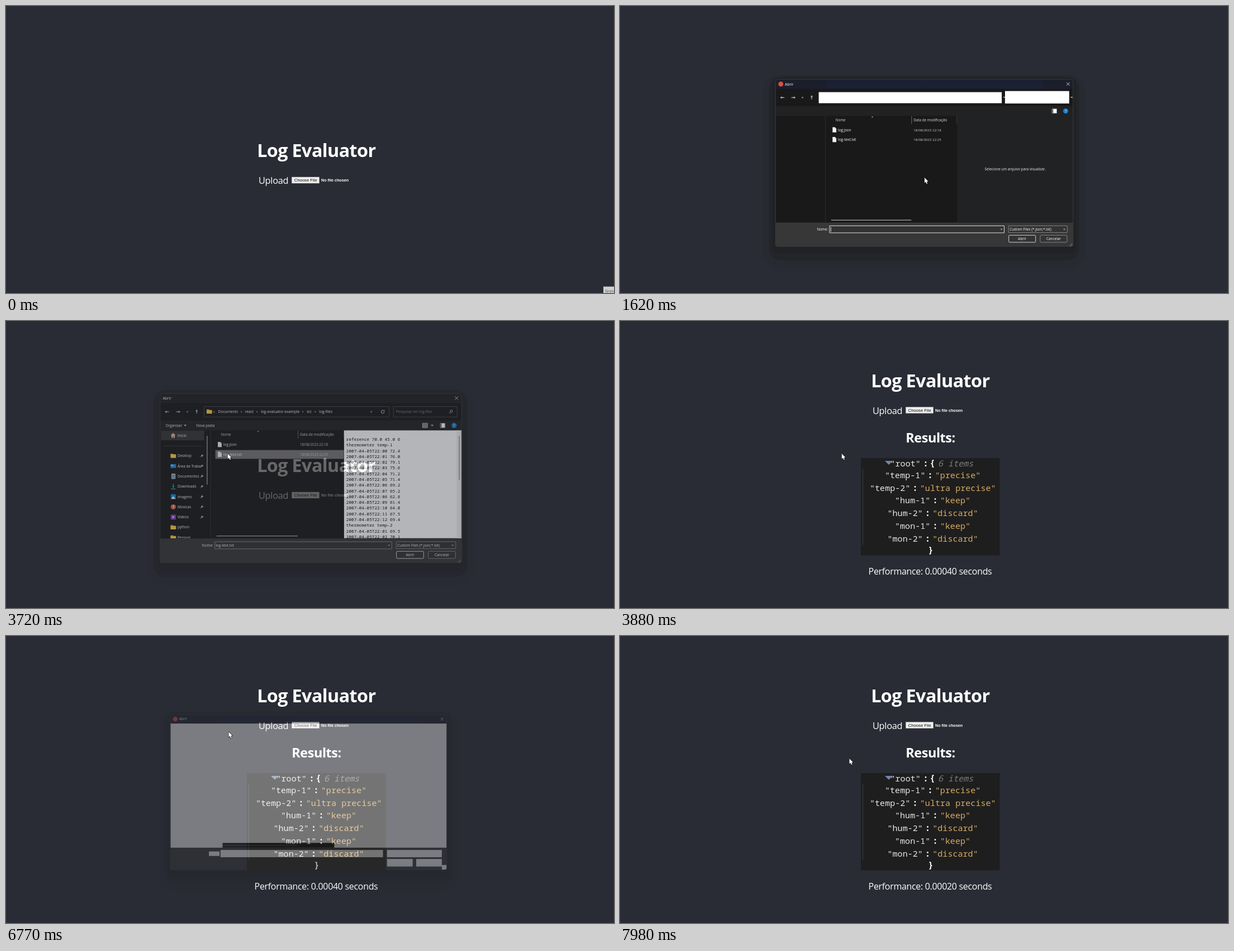
Animation, 1088 px wide and 515 px high, one loop 8000 ms. Source, as an HTML page with a canvas:

```html
<!DOCTYPE html>
<html lang="en">
<head>
<meta charset="utf-8">
<title>Log Evaluator</title>
<style>
html, body { margin: 0; width: 100%; height: 100%; overflow: hidden; background: #2a2c35; }
canvas { display: block; width: 1088px; height: 515px; }
</style>
</head>
<body>
<canvas id="stage" width="1088" height="515"></canvas>
<script>
const W = 1088, H = 515, LOOP = 8000;
const screen = document.getElementById('stage').getContext('2d');
const layer = new OffscreenCanvas(W, H).getContext('2d');
const UI = '"Open Sans", "Noto Sans", sans-serif';
const ARIAL = '"Liberation Sans", Arial, sans-serif';
const MONO = '"Noto Sans Mono", "DejaVu Sans Mono", monospace';
let g = screen;

// ---- drawing helpers ----
function rect(x1, y1, x2, y2, fill) {
  g.fillStyle = fill;
  g.fillRect(x1, y1, x2 - x1, y2 - y1);
}
function round(x1, y1, x2, y2, r, fill, stroke) {
  g.beginPath();
  g.roundRect(x1, y1, x2 - x1, y2 - y1, r);
  if (fill) { g.fillStyle = fill; g.fill(); }
  if (stroke) { g.strokeStyle = stroke; g.lineWidth = 1; g.stroke(); }
}
function line(color, width, ...p) {
  g.beginPath();
  for (let i = 0; i < p.length; i += 2) g.lineTo(p[i], p[i + 1]);
  g.strokeStyle = color;
  g.lineWidth = width;
  g.stroke();
}
function poly(fill, ...p) {
  g.beginPath();
  for (let i = 0; i < p.length; i += 2) g.lineTo(p[i], p[i + 1]);
  g.closePath();
  g.fillStyle = fill;
  g.fill();
}
function disc(x, y, r, fill) {
  g.beginPath();
  g.arc(x, y, r, 0, 7);
  g.fillStyle = fill;
  g.fill();
}
// y is the middle of the capital letters
function text(s, x, y, size, color = '#fff', align = 'left', font = UI, style = '') {
  g.font = `${style} ${size}px ${font}`;
  g.textAlign = align;
  g.fillStyle = color;
  g.fillText(s, x, y + size * 0.357);
}
// page type is set slightly tight
function heading(s, x, y, size, align, style) {
  g.letterSpacing = -0.02 * size + 'px';
  text(s, x, y, size, '#fff', align, UI, style);
  g.letterSpacing = '0px';
}
function chevron(x, y, dx, dy, color = '#ccc') {
  line(color, 0.9, x - dx - dy, y - dy - dx, x + dx, y + dy, x - dx + dy, y - dy + dx);
}
function caretDown(x, y) {
  poly('#ccc', x - 2.5, y - 1.3, x + 2.5, y - 1.3, x, y + 1.5);
}

// ---- page ----
function fileInput(dy, hover) {
  heading('Upload', 452, 313.5 + dy, 16.4);
  rect(511, 306.5 + dy, 561, 318.5 + dy, '#767676');
  rect(511.6, 307.1 + dy, 560.4, 317.9 + dy, hover ? '#e2e2e2' : '#efefef');
  text('Choose File', 536.2, 312.7 + dy, 7.7, '#111', 'center', ARIAL);
  text('No file chosen', 564, 312.7 + dy, 7.2, '#fff', 'left', ARIAL, 'bold');
}
const entries = [
  ['temp-1', 'precise', 474, 277], ['temp-2', 'ultra precise', 447, 299.5],
  ['hum-1', 'keep', 492, 322], ['hum-2', 'discard', 478.5, 345],
  ['mon-1', 'keep', 492, 368], ['mon-2', 'discard', 478.5, 390.5]
];
function code(s, x, y, color, align, style = '500') {
  text(s, x, y, 15.1, color, align, MONO, style);
}
function results(time) {
  heading('Results:', 555.5, 210, 23.5, 'center', 'bold');
  rect(431, 246, 679.5, 420.5, '#1e1e1e');
  line('#3b3d40', 1, 434.5, 265, 434.5, 402);
  code('"root"', 483.5, 256, '#e6e6e6');
  poly('#7485ae', 474, 251, 488, 251, 481, 258);
  code(':', 547, 256, '#fff', 'center', 'bold');
  code('{', 559, 256, '#fff', 'center', 'bold');
  code('6 items', 569, 256, '#7c7c7c', 'left', 'italic');
  for (const [key, value, x, y] of entries) {
    const end = x + 9.06 * (key.length + 2);
    code(`"${key}"`, x, y, '#e6e6e6');
    code(':', end + 8.5, y, '#fff', 'center', 'bold');
    code(`"${value}"`, end + 17.3, y, '#d6aa66');
  }
  code('}', 556, 411.5, '#fff', 'center', 'bold');
  heading(`Performance: ${time} seconds`, 555, 449.7, 16, 'center');
}
function page(t, mouse) {
  const done = t >= 3880, dy = done ? -152.5 : 0;
  rect(0, 0, W, H, '#2a2c35');
  heading('Log Evaluator', 555.3, 259.6 + dy, 32.4, 'center', 'bold');
  const hover = mouse && mouse[0] > 511 && mouse[0] < 561 &&
    mouse[1] > 306 + dy && mouse[1] < 319 + dy;
  fileInput(dy, hover);
  if (done) results(t < 7980 ? '0.00040' : '0.00020');
  if (t < 70) {
    rect(1069, 503.5, W, H, '#cfcfcf');
    text('Gravar', 1072, 512, 7, '#555');
  }
}

// ---- dialog ----
const places = ['Desktop', 'Área de Traba', 'Documentos', 'Downloads', 'Imagens',
  'Músicas', 'Vídeos', 'python', 'Pessoal'];
const temps = '72.4 76.0 79.1 75.6 71.2 71.4 69.2 65.2 62.8 61.4 64.0 67.5 69.4'.split(' ');
const stamp = (v, m) => `2007-04-05T22:${String(m).padStart(2, '0')} ${v}`;
const preview = ['reference 70.0 45.0 6', 'thermometer temp-1', ...temps.map(stamp),
  'thermometer temp-2', stamp('69.5', 1), stamp('70.1', 2)];

function folder(x, y) {
  round(x - 5, y - 4, x, y, 0.8, '#d99a1c');
  round(x - 5, y - 2.8, x + 5, y + 4, 0.8, '#ffcf4d');
}
function placeIcon(i, x, y) {
  if (i === 0 || i > 6) folder(x, y);
  else if (i === 1) { rect(x - 5, y - 3.5, x + 5, y + 3.5, '#1d8fe0'); rect(x - 4, y - 2, x, y, '#9fe0ff'); }
  else if (i === 2) { round(x - 3.5, y - 5, x + 4, y + 5, 1, '#9db4c4'); rect(x - 2, y - 2, x + 2.5, y - 1, '#45606f'); rect(x - 2, y + 1, x + 2.5, y + 2, '#45606f'); }
  else if (i === 3) { line('#2bbf9c', 1.2, x, y - 5, x, y + 2); chevron(x, y + 1, 0, 1.6, '#2bbf9c'); line('#2bbf9c', 1.2, x - 4, y + 4.5, x + 4, y + 4.5); }
  else if (i === 4) { round(x - 4.5, y - 4.5, x + 4.5, y + 4.5, 1, '#1686d9'); poly('#e8f6ff', x - 4, y + 4, x, y - 1, x + 4, y + 4); }
  else if (i === 5) { disc(x, y, 4.7, '#d9694f'); line('#fff', 1, x, y + 2, x, y - 2.5, x + 1.8, y - 1.5); }
  else { round(x - 4.5, y - 4.5, x + 4.5, y + 4.5, 1, '#8447c9'); poly('#fff', x - 1.4, y - 2, x + 2, y, x - 1.4, y + 2); }
}
function pin(x, y) {
  poly('#b5b5b5', x, y - 3, x + 3, y, x + 1, y + 0.6, x - 0.6, y + 2, x - 2, y - 0.6, x - 0.6, y - 1);
  line('#b5b5b5', 0.8, x - 1, y + 0.8, x - 3, y + 2.8);
}
function sidebar() {
  rect(273, 195.5, 351.5, 213, '#363636');
  poly('#e9a36b', 290.5, 204, 295, 199.5, 299.5, 204);
  rect(292, 203.5, 298, 208.5, '#d9d9d9');
  rect(294, 205, 296, 208.5, '#8a5a3a');
  text('Início', 303, 204.5, 6.6);
  line('#3c3c3c', 1, 277, 223.5, 348, 223.5);
  line('#a5a5a5', 1.4, 357, 205, 357, 294);
  g.save();
  g.beginPath();
  g.rect(271, 195, 92, 197);
  g.clip();
  places.forEach((name, i) => {
    const y = 241.5 + 18.65 * i;
    placeIcon(i, 295.3, y);
    text(name, 303, y, 6.6);
    if (i < 7) pin(347.5, y);
  });
  g.restore();
}
function navArrow(x, y, dx, dy) {
  const c = '#d8d8d8';
  line(c, 1, x - dx * 3.5, y - dy * 3.5, x + dx * 3.5, y + dy * 3.5);
  chevron(x + dx * 2, y + dy * 2, dx * 1.5, dy * 1.5, c);
}
function navBar(full) {
  navArrow(284, 161, -1, 0);
  navArrow(304, 161, 1, 0);
  chevron(321, 161, 0, 1.2);
  navArrow(338, 161, 0, -1);
  if (!full) {
    rect(351, 151, 689, 171.5, '#fff');
    rect(695, 149, 813.5, 172, '#fff');
    rect(692, 160, 695, 161, '#fff');
    rect(816, 160, 820, 161, '#fff');
    return;
  }
  round(351.5, 151.5, 688.5, 170.5, 0, null, '#484848');
  folder(361, 160.5);
  text('«', 368, 160.5, 6.8, '#ccc');
  const crumbs = [['Documents', 377], ['react', 426], ['log-evaluator-example', 455],
    ['src', 538.5], ['log-files', 561]];
  for (const [s, x] of crumbs) text(s, x, 161, 6.75);
  for (const x of [419.5, 448, 531.5, 554]) chevron(x, 161, 0.9, 0);
  chevron(656, 161, 0, 1.2);
  g.beginPath();
  g.arc(677, 161, 2.8, 0, 5.3);
  g.strokeStyle = '#ccc';
  g.lineWidth = 1;
  g.stroke();
  poly('#ccc', 678, 160, 680.4, 160, 680.4, 157.6);
  round(696.5, 151.5, 812.5, 170.5, 0, null, '#484848');
  text('Pesquisar em log-files', 701, 161, 6.5, '#858585');
  g.beginPath();
  g.arc(802, 160, 2.2, 0, 7);
  g.strokeStyle = '#bbb';
  g.stroke();
  line('#bbb', 1, 800.4, 161.6, 798, 164);
}
function toolbar(full) {
  rect(271, 177, 821, 195, '#202224');
  if (full) {
    text('Organizar', 281.5, 186, 6.5);
    caretDown(317, 186);
    text('Nova pasta', 337, 186, 6.5);
    round(749.5, 182, 758.5, 190, 0, '#555', '#bbb');
    for (const y of [184, 186, 188]) line('#ddd', 0.7, 750, y, 758, y);
    caretDown(767, 186);
  }
  round(782, 182, 790.5, 190, 0, '#fff', '#999');
  rect(782.5, 182.5, 784, 189.5, '#444');
  disc(807, 186, 4.7, '#0c84d8');
  text('?', 807, 186, 6.5, '#fff', 'center');
}
function fileRow(name, time, y, shade) {
  if (shade) rect(372, y - 8, 606, y + 8, shade);
  poly('#f2f2f2', 376.5, y - 5, 381, y - 5, 383.5, y - 2.5, 383.5, y + 4.5, 376.5, y + 4.5);
  poly('#a9a9a9', 381, y - 5, 383.5, y - 2.5, 381, y - 2.5);
  text(name, 386.5, y, 6.7);
  text('18/08/2023 ' + time, 526, y, 6.3, '#d0d0d0');
}
function fileList(d) {
  text('Nome', 382, 203, 6.5, '#ddd');
  chevron(450, 197, 0, -1);
  for (const x of [522.5, 606.5]) line('#6a6a6a', 1, x, 195.5, x, 210);
  text('Data de modificação', 526, 203, 6.5, '#ddd');
  const shade = i => d.pick === i ? '#777' : d.hover === i ? '#4b4b4b' : null;
  fileRow('log.json', '22:18', 221, shade(0));
  fileRow('log-text.txt', '22:25', 239, shade(1));
  line('#d5d5d5', 1, 374, 388, 522, 388);
}
function previewPane(d) {
  rect(606.5, 195, 821, 392, d.loaded ? '#fff' : '#202224');
  if (d.hint) text('Selecione um arquivo para visualizar.', 714, 294, 6.55, '#eee', 'center');
  if (!d.loaded) return;
  rect(811.5, 195, 821, 392, '#f0f0f0');
  line('#777', 1.2, 816.5, 205, 816.5, 285);
  g.save();
  g.beginPath();
  g.rect(607, 195, 204, 197);
  g.clip();
  preview.forEach((s, i) => text(s, 610.5, 211.2 + i * 10.48, 7.8, '#111', 'left', MONO));
  g.restore();
}
function footer(d, t) {
  text('Nome:', 368, 405, 6.5, '#fff', 'right');
  round(371, 398.5, 693.5, 411.5, 0, '#333', d.name ? '#8d8d8d' : '#e6e6e6');
  if (d.name) text(d.name, 372.5, 405.3, 6.7);
  else if ((t + 500) % 1060 < 530) line('#fff', 0.8, 373.5, 401, 373.5, 409.5);
  chevron(688.5, 405, 0, 1.2);
  round(701.5, 398.5, 810, 411, 0, '#333', '#858585');
  text('Custom Files (*.json;*.txt)', 703.5, 405, 6.5);
  chevron(804.5, 405, 0, 1.2);
  round(702, 416, 751.5, 429, 1.5, '#333', '#d8d8d8');
  text('Abrir', 726.8, 422.5, 6.6, '#fff', 'center');
  round(760, 416, 809.5, 429, 1.5, '#333', '#8a8a8a');
  text('Cancelar', 784.8, 422.5, 6.6, '#fff', 'center');
  for (let i = 0; i < 3; i++)
    for (let j = 0; j <= i; j++) rect(818 - 2 * j, 431 + 2 * i, 819 - 2 * j, 432 + 2 * i, '#aaa');
}
function blankBody() {
  rect(271, 145, 821, 392.5, '#fff');
  rect(375, 383, 597, 392.5, '#111');
  line('#777', 1, 375, 388, 523, 388);
  const blanks = [[348, 400, 369, 409], [371, 397, 694, 411.5], [702, 397, 811, 411.5],
    [702, 415, 753, 430], [760, 415, 811, 430], [811, 427, 821, 437]];
  for (const b of blanks) rect(...b, '#fff');
}
function shadow() {
  round(248, 119, 843, 478, 30, 'rgba(0,0,0,.04)');
  round(259, 122, 832, 463, 22, 'rgba(32,33,34,.45)');
  round(265, 125, 827, 450, 14, 'rgba(32,33,34,.4)');
}
function dialogBody(d, t) {
  shadow();
  g.save();
  g.beginPath();
  g.roundRect(271, 127, 550, 310, 4);
  g.clip();
  rect(271, 127, 821, 437, '#191919');
  rect(271, 127, 821, 145, d.inactive ? '#202124' : '#1b1e2b');
  if (!d.inactive) rect(365, 127, 765, 145, '#1b2032');
  rect(271, 392.5, 821, 437, '#373737');
  if (!d.inactive) disc(281, 136, 4.6, '#db4f3f');
  text('Abrir', d.inactive ? 276 : 288.5, 136.3, 6.9);
  line('#ddd', 0.9, 808.5, 133, 814.5, 139);
  line('#ddd', 0.9, 814.5, 133, 808.5, 139);
  if (d.paint === 0) blankBody();
  else {
    const full = d.paint === 2;
    navBar(full);
    toolbar(full);
    if (full) sidebar();
    line('#303030', 1, 363.5, 195, 363.5, 392);
    fileList(d);
    previewPane(d);
    footer(d, t);
  }
  g.restore();
  round(271.3, 127.3, 820.7, 436.7, 4, null, '#3b3c3f');
}

// Each visit: when it opens, its step, the click, preview and closing times.
const visits = [
  { open: 1540, step: 80, click: 3260, load: 3480, grey: 3640, close: 3720, name: 'log-text.txt', row: 1 },
  { open: 6770, step: 70, click: 7510, load: 7660, grey: 7740, close: 7820, name: 'log.json', row: 0 }
];
// scale, opacity, how much is painted
const grow = [[0.9, 0.38, 0], [0.969, 1, 1], [0.99, 1, 2], [1, 1, 2]];
const shrink = [[0.982, 0.65, 2], [0.936, 0.25, 2]];

function dialog(t, mouse) {
  const v = visits.find(v => t >= v.open && t < v.close + 160);
  if (!v) return;
  const closing = t >= v.close;
  const [scale, alpha, paint] = closing
    ? shrink[Math.min(1, Math.floor((t - v.close) / 80))]
    : grow[Math.min(3, Math.floor((t - v.open) / v.step))];
  const picked = t >= v.click;
  const [mx, my] = mouse;
  const over = paint === 2 && mx > 372 && mx < 606;
  const d = {
    paint,
    hover: over && my >= 213 && my < 229 ? 0 : over && my >= 231 && my < 247 ? 1 : -1,
    pick: picked ? v.row : -1,
    name: picked ? v.name : '',
    hint: t < v.click - 240,
    loaded: t >= v.load,
    inactive: t >= v.grey
  };
  const cx = closing ? 520 : 500, cy = 266;
  g = layer;
  g.setTransform(1, 0, 0, 1, 0, 0);
  g.clearRect(0, 0, W, H);
  g.setTransform(scale, 0, 0, scale, cx * (1 - scale), cy * (1 - scale));
  dialogBody(d, t);
  g = screen;
  g.globalAlpha = alpha;
  g.drawImage(layer.canvas, 0, 0);
  g.globalAlpha = 1;
}

// ---- pointer ----
// start, end, steps, target x, target y
const moves = [
  [210, 990, 11, 553, 307], [1540, 1540, 1, 545, 308], [2000, 2700, 10, 396.8, 238],
  [4640, 4960, 5, 648, 451.5], [5350, 5740, 6, 546, 171.5], [5890, 6045, 3, 551, 160],
  [6360, 6670, 5, 398.5, 172], [7120, 7430, 5, 410.5, 220]
];
function pointer(t) {
  if (t < 210) return null;
  let x = 1002, y = 486;
  for (const [a, b, n, tx, ty] of moves) {
    if (t < a) break;
    const i = n > 1 ? Math.min(n, 1 + Math.floor((t - a) / (b - a) * (n - 1) + 1e-6)) : n;
    const p = a === 210 ? (i - 1) / (n - 1) : i / n;
    const e = p * p * (3 - 2 * p);
    x += (tx - x) * e;
    y += (ty - y) * e;
  }
  return [x, y];
}
// start, end, radius of the highlight
const clicks = [[1060, 1390, 5], [2940, 3260, 7], [3400, 3560, 7], [6120, 6200, 5], [7510, 7590, 7], [7660, 7740, 7]];
function drawPointer(t, [x, y]) {
  const c = clicks.find(c => t >= c[0] && t < c[1]);
  if (c) disc(x - 0.5, y, c[2], '#fbf33c');
  const p = [0, 0, 0, 9.6, 2.1, 7.6, 3.7, 11, 5.3, 10.2, 3.8, 7, 6.6, 6.8].map((v, i) => v + (i % 2 ? y : x));
  line('#111', 1.2, ...p, x, y);
  poly('#fff', ...p);
}

function draw(t) {
  const mouse = pointer(t);
  page(t, mouse);
  dialog(t, mouse);
  if (t >= 3020 && t < 3260) round(367, 184, 425, 242, 2, '#fff');
  if (mouse) drawPointer(t, mouse);
}
function tick() {
  draw(performance.now() % LOOP);
  requestAnimationFrame(tick);
}
tick();
</script>
</body>
</html>
```
